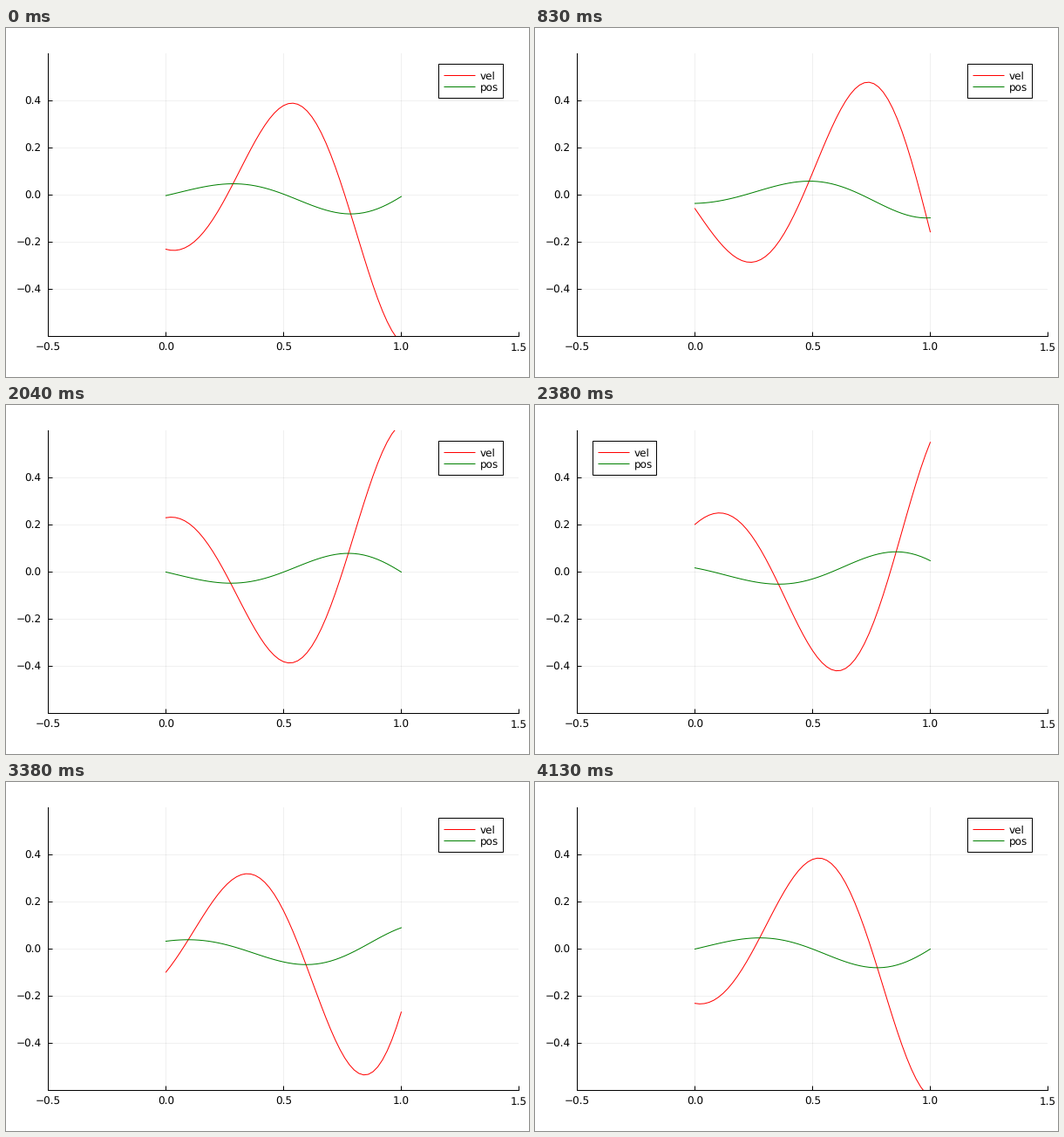
Animation, 600 px wide and 400 px high, one loop 4180 ms. Source, as a matplotlib script:

```python
import numpy as np
import matplotlib.pyplot as plt
from matplotlib.animation import FuncAnimation
from matplotlib.patches import Rectangle

W, H, DPI = 600, 400, 100
PX = 72 / DPI                    # one pixel in points
LEFT, RIGHT, TOP, BOTTOM = 48.45, 588.45, 29.45, 353.45
TICK_MS, LOOP_MS = 20, 4180
STEPS, FPS = 100, 24
YMAX = 0.6

plt.rcParams.update({
    "font.family": "DejaVu Sans",
    "font.size": 12 * PX,
    "text.hinting": "none",
})

fig = plt.figure(figsize=(W / DPI, H / DPI), dpi=DPI, facecolor="white")


def make_plot():
    ax = fig.add_axes([LEFT / W, 1 - BOTTOM / H,
                       (RIGHT - LEFT) / W, (BOTTOM - TOP) / H])
    ax.set(xlim=(-0.5, 1.5), ylim=(-YMAX, YMAX),
           xticks=np.arange(-1, 4) / 2, yticks=np.arange(-2, 3) / 5)
    ax.set_axisbelow(True)
    ax.grid(color="black", alpha=0.06, lw=PX)
    ax.tick_params(direction="in", length=5 * PX, width=PX)
    ax.tick_params(axis="x", pad=7 * PX)
    ax.tick_params(axis="y", pad=8 * PX)
    ax.spines[["top", "right"]].set_visible(False)
    ax.spines[["left", "bottom"]].set_linewidth(PX)
    return ax


def make_overlay():
    """Transparent layer measured in pixels from the top left."""
    ax = fig.add_axes([0, 0, 1, 1])
    ax.set(xlim=(0, W), ylim=(H, 0))
    ax.axis("off")
    return ax


ax = make_plot()
overlay = make_overlay()

# Swimming body: a travelling wave that grows towards the tail
x = np.linspace(0, 1, 51)
envelope = 0.1 * (0.367 + 0.323 * x + 0.310 * x**2)
vel_line, = ax.plot([], [], color="red", lw=PX)
pos_line, = ax.plot([], [], color="green", lw=PX)

# Legend, moved between the two upper corners
BOX_W, BOX_H, BOX_Y, ROW = 73.2, 39, 41.4, 13
BOX_LEFT, BOX_RIGHT = 66.2, 496.4
box = overlay.add_patch(Rectangle((0, BOX_Y), BOX_W, BOX_H, fc="white",
                                  ec="black", lw=PX))
entries = []
for row, (name, color) in enumerate([("vel", "red"), ("pos", "green")], 1):
    y = BOX_Y + row * ROW
    key, = overlay.plot([0, 0], [y, y], color=color, lw=PX,
                        solid_capstyle="butt")
    entries.append((key, overlay.text(0, y + 4.7, name, va="baseline")))


def place_legend(left):
    box.set_x(left)
    for key, label in entries:
        key.set_xdata([left + 6, left + 42])
        label.set_x(left + 47.7)


def update(n):
    # The wave advances at 24 steps a second, timed to 10 ms
    ms = n * TICK_MS + 10
    step = min(int((ms + 4.9) * FPS / 1000), STEPS - 1)
    phase = 2 * np.pi * (x - (step + 1) / STEPS)
    pos = envelope * np.sin(phase)
    vel = -2 * np.pi * envelope * np.cos(phase)
    vel_line.set_data(x, vel)
    pos_line.set_data(x, pos)
    # Dodge the curve when its end enters the upper right area
    crowded = YMAX / 2 <= vel[-1] <= YMAX
    place_legend(BOX_LEFT if crowded else BOX_RIGHT)
    return vel_line, pos_line, box


anim = FuncAnimation(fig, update, frames=LOOP_MS // TICK_MS,
                     init_func=lambda: update(0), interval=TICK_MS,
                     repeat=True, repeat_delay=0)

plt.show()
```
